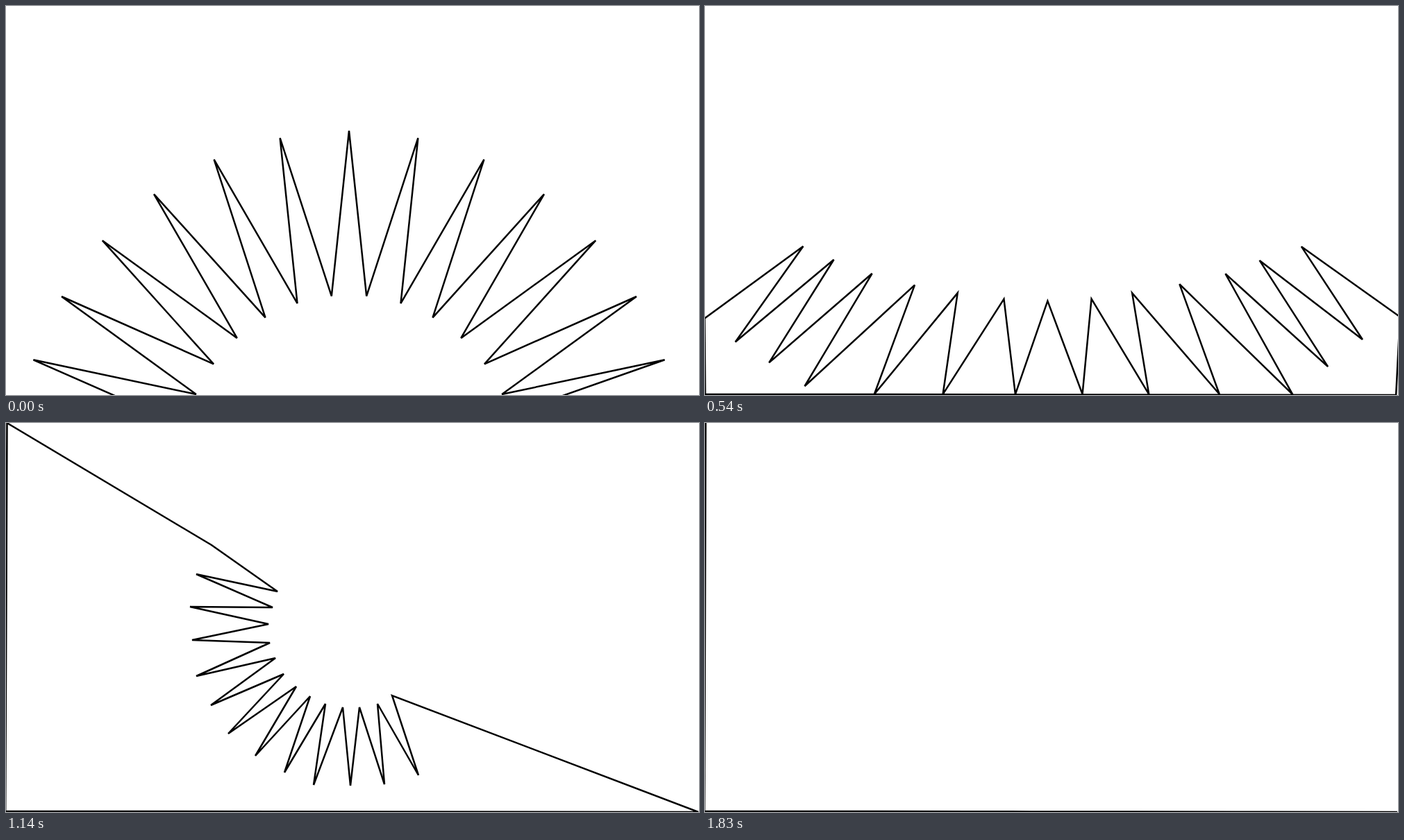
Write an HTML page that moves like this. It is 998 px wide and 561 px high and loops after 1.86 s.

```html
<!DOCTYPE html>
<html>
<head>
<meta charset="utf-8">
<style>
  html, body { margin: 0; width: 100%; height: 100%; overflow: hidden; background: #fff; }
  svg { display: block; width: 998px; height: 561px; }
</style>
</head>
<body>
<svg viewBox="0 0 998 561">
  <polygon id="shape" fill="none" stroke="#000" stroke-width="2.5" stroke-linejoin="miter" stroke-miterlimit="4"/>
</svg>
<script>
const LOOP = 1860, STEP = 30;
const LEFT = [-0.8, 559.8], RIGHT = [997, 561];

// Weave 14 inner points and 13 outer tips between two base corners.
function pose(time, inner, outer, a = LEFT, b = RIGHT) {
  const points = [a];
  inner.forEach((p, i) => {
    points.push(p);
    if (outer[i]) points.push(outer[i]);
  });
  points.push(b);
  return { time, points };
}

const arc = (count, start, r) => Array.from({ length: count }, (_, i) => {
  const angle = (start + 12 * i) * Math.PI / 180;
  return [494 + r * Math.sin(angle), 658 - r * Math.cos(angle)];
});
const row = (y, xs) => xs.map(x => [x, y]);
const floor = xs => xs.map(x => [x, 559.8 + x * 0.0013]);
const wall = (x, ys) => ys.map(y => [x, y]);

// Half sun, cut off by the lower edge.
const sunStart = [158, 562.6], sunEnd = [800, 562.6];
const sunInner = [sunStart, ...arc(14, -78, 241).slice(1, 13), sunEnd];

// Bowl whose spikes point inwards.
const bowlInner = [
  [-3, 275], [0, 363], [3, 441], [2, 529], [138, 559], [270, 559], [426, 559],
  [594, 559], [726, 559], [862, 559], [997, 560], [998, 456], [998, 354], [1000.5, 269]
];
const bowlTips = [
  [299, 269], [300, 319], [320, 371], [350, 414], [389, 444], [444, 467], [510, 474],
  [575, 466], [617, 444], [652, 411], [683, 372], [694, 322], [697, 270]
];

// Small star, open to the upper right.
const starInner = [
  [1.5, 0], [391, 243], [384, 266], [378, 290], [380, 317], [388, 339], [400, 362],
  [418, 380], [438, 394], [460, 405], [485, 410], [509, 410], [535, 405], [556, 393]
];
const starTips = [
  [296, 176], [274, 218], [265, 265], [268, 313], [274, 365], [295, 407], [320, 448],
  [359, 480], [401, 504], [443, 522], [496, 523], [545, 521], [594, 508]
];

const tipYs = [134, 245, 351, 453], tipXs = [192, 295, 375, 441, 498, 556, 620];

const poses = [
  pose(0, sunInner, arc(13, -72, 478), sunStart, sunEnd),
  pose(390,
    row(560.3, [1, 71, 148, 232, 310, 388, 460, 512, 585, 665, 752, 834, 915, 1001]),
    row(395, [43, 114, 191, 272, 348, 422, 483, 545, 614, 703, 791, 864, 960]),
    [1, 559.8], [994, 561]),
  pose(780, bowlInner, bowlTips),
  pose(1140, starInner, starTips),
  pose(1470, starInner,
    [[-3, -2], ...wall(-4, tipYs), [14, 563], ...row(565, tipXs)]),
  pose(1830,
    [[1, 0], ...wall(-0.6, [70, 190, 298, 402, 508]),
      ...floor([103, 244, 335, 408, 470, 527, 588, 808])],
    [[0.8, 1], ...wall(-0.7, tipYs), LEFT, ...floor(tipXs)])
];

const shape = document.getElementById("shape");
const begin = performance.now();

function draw(now) {
  const elapsed = Math.max(0, now - begin) % LOOP;
  const t = Math.min(Math.floor(elapsed / STEP) * STEP, 1830);
  const k = Math.max(1, poses.findIndex(p => p.time >= t));
  const from = poses[k - 1], to = poses[k];
  const f = (t - from.time) / (to.time - from.time);
  shape.setAttribute("points", from.points.map((p, i) =>
    p.map((v, j) => (v + (to.points[i][j] - v) * f).toFixed(2)).join()).join(" "));
  requestAnimationFrame(draw);
}
draw(begin);
</script>
</body>
</html>
```
